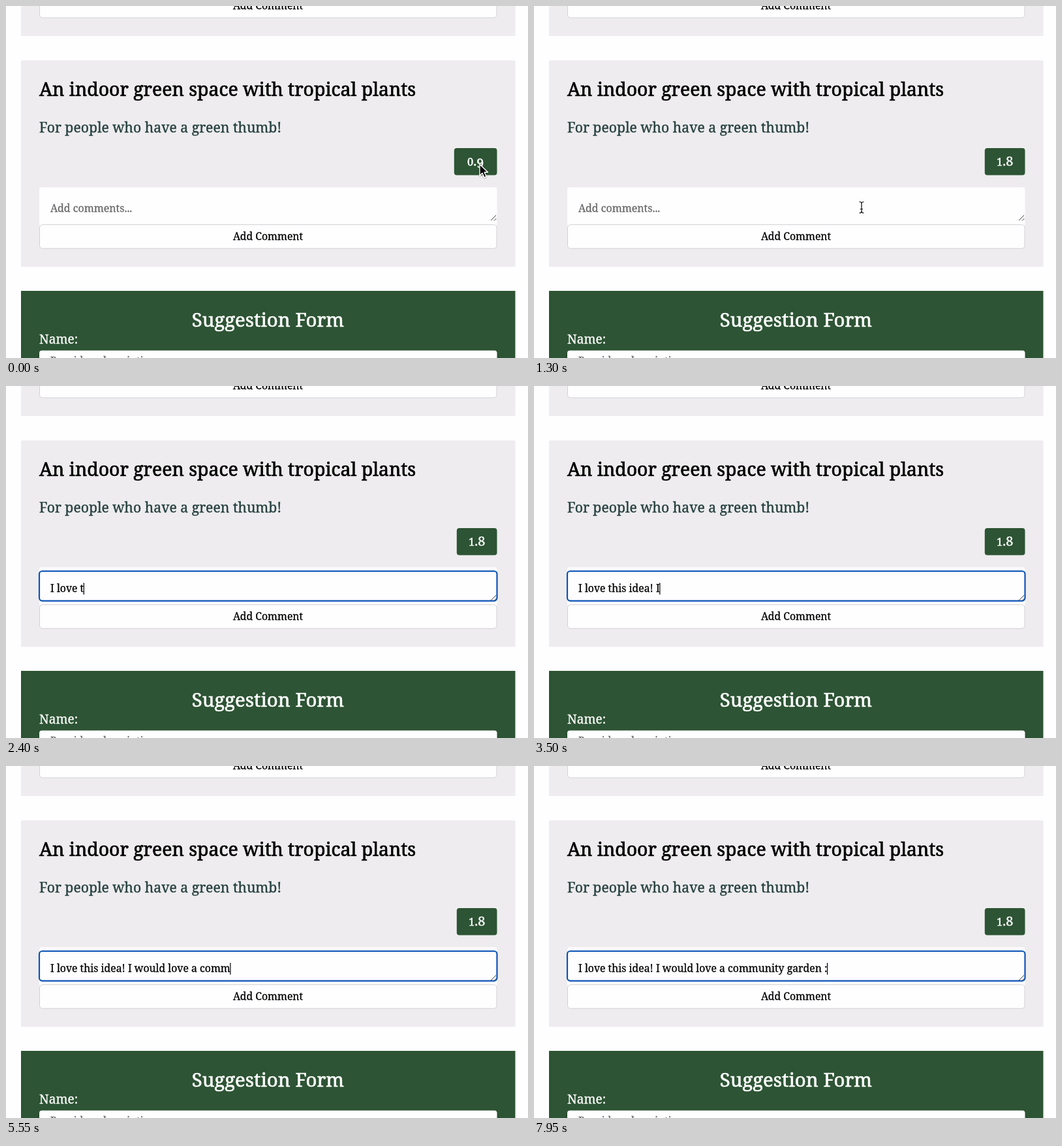
An HTML page for the animation above (8000 ms loop, 800 px wide and 540 px high).

```html
<!DOCTYPE html>
<html lang="en">
<head>
<meta charset="utf-8">
<title>Community suggestions</title>
<style>
  html, body { margin: 0; width: 100%; height: 100%; overflow: hidden; background: #fefdff; }
  svg { display: block; width: 800px; height: 540px; }
  text {
    font-family: "Noto Serif", serif; font-size: 15.8px; white-space: pre;
    color: #000; fill: currentColor; stroke: currentColor; stroke-width: .3px;
  }
  .mid { text-anchor: middle; }
  .title { font-size: 28.45px; stroke-width: .7px; }
  .sub { font-size: 21.2px; color: #264040; stroke-width: .4px; }
  .hint { font-size: 15.95px; color: #686868; }
  .light { color: #fff; }
  .heading { font-size: 29.4px; stroke-width: .7px; }
  .label { font-size: 19.2px; }
  .score { font-size: 19.8px; stroke-width: .5px; }
  .small-figure { font-size: 16.5px; }
  .panel { fill: #fefdff; }
  .green { fill: #2d5434; }
</style>
</head>
<body>
<svg viewBox="0 0 800 540">
  <defs>
    <filter id="soft" x="-50%" y="-50%" width="200%" height="200%">
      <feDropShadow dx="0" dy="1" stdDeviation="1" flood-opacity=".35"/>
    </filter>
    <g id="card">
      <rect x="23" y="83.5" width="757.5" height="316.5" fill="#eeecee"/>
      <rect class="panel" x="51" y="278" width="701.5" height="60" rx="4"/>
      <rect class="panel" x="51.5" y="335.5" width="700.5" height="36.5" rx="4.5" stroke="#d2d1d4"/>
      <text class="mid" x="401.5" y="359">Add Comment</text>
    </g>
    <path id="beam-shape" d="M-3 -8.5 Q0 -8.5 0 -6 V6 Q0 8.5 -3 8.5 M3 -8.5 Q0 -8.5 0 -6 M0 6 Q0 8.5 3 8.5 M-1.5 2.5 H1.5"/>
  </defs>
  <rect class="panel" width="800" height="540"/>
  <use href="#card" y="-354"/>
  <use href="#card"/>

  <text class="title" x="51" y="138">An indoor green space with tropical plants</text>
  <text class="sub" x="51" y="193.5">For people who have a green thumb!</text>
  <rect id="badge" class="green" y="218" height="41.5" rx="4"/>
  <text id="score" class="score light mid" y="245"></text>

  <rect id="focus" x="51" y="284" width="701.5" height="45.6" rx="4.5" fill="#fefdff" stroke="#0c54b6" stroke-width="2.2"/>
  <path d="M743 329 L751 321 M748 329.5 L751.5 326" stroke="#444" fill="none"/>
  <text id="hint" class="hint" x="68" y="316">Add comments...</text>
  <text id="typed" x="68" y="316"></text>
  <rect id="caret" y="302" width="1.2" height="18"/>

  <rect class="green" x="23" y="437" width="757.5" height="103"/>
  <text class="heading light mid" x="401.5" y="492">Suggestion Form</text>
  <text class="label light" x="51" y="517.5">Name:</text>
  <rect class="panel" x="51" y="528.5" width="701.5" height="40" rx="4" filter="url(#soft)"/>
  <text class="hint" x="68" y="550">Provide a description</text>

  <path id="arrow" d="M0 0 V17 L4 13.2 L7 20 L10 18.7 L7.1 12 H12.5 Z" stroke="#fff" stroke-width="1.3" stroke-linejoin="round" filter="url(#soft)"/>
  <g id="beam" fill="none" stroke-linecap="round">
    <use href="#beam-shape" stroke="#fff" stroke-width="2.6"/>
    <use href="#beam-shape" stroke="#000" stroke-width="1.2"/>
  </g>
</svg>
<script>
const LOOP = 8000, FOCUS_AT = 1550, TYPING_AT = 1650;
const MESSAGE = "I love this idea! I would love a community garden :";
const SCORES = [[0, "0.9"], [200, "1.2"], [450, "1.5"], [700, "1.8"]];
// [time, characters typed]
const TYPING = [[TYPING_AT, 0], [2370, 8], [4510, 29], [5510, 37], [6760, 45], [7450, 50], [7800, 50], [7850, 51]];
const MOVE = { start: 820, end: 1270, from: [726, 243], to: [502, 309] };

const [badge, score, focusRing, hint, typed, caret, arrow, beam] =
  ["badge", "score", "focus", "hint", "typed", "caret", "arrow", "beam"].map(id => document.getElementById(id));
const show = (node, on) => node.setAttribute("visibility", on ? "visible" : "hidden");
const clamp = v => Math.max(0, Math.min(1, v));

function track(points, t) {
  if (t <= points[0][0]) return points[0][1];
  for (let i = 1; i < points.length; i++) {
    const [t0, a] = points[i - 1], [t1, b] = points[i];
    if (t < t1) return a + (b - a) * (t - t0) / (t1 - t0);
  }
  return points.at(-1)[1];
}

// Old-style figures: 0-2 sit at x-height, most others hang below the baseline.
function oldStyle(value) {
  let shift = 0;
  return [...value].map(c => {
    const target = "34579".includes(c) ? 3 : 0;
    const dy = target - shift;
    shift = target;
    return `<tspan dy="${dy}" class="${"012".includes(c) ? "small-figure" : ""}">${c}</tspan>`;
  }).join("");
}

let shownScore;
function drawScore(t) {
  const value = SCORES.findLast(([at]) => t >= at)[1];
  if (value === shownScore) return;
  shownScore = value;
  const left = value[0] === "0" ? 686.8 : 690.8, right = 752.5;
  badge.setAttribute("x", left);
  badge.setAttribute("width", right - left);
  score.setAttribute("x", (left + right) / 2);
  score.innerHTML = oldStyle(value);
}

function drawInput(t) {
  const focused = t >= FOCUS_AT;
  const text = MESSAGE.slice(0, Math.floor(track(TYPING, t) + 1e-6));
  show(focusRing, focused);
  show(caret, focused);
  show(hint, !text);
  if (typed.textContent !== text) typed.textContent = text;
  caret.setAttribute("x", 67.5 + (text ? typed.getComputedTextLength() : 0));
}

function drawPointer(t) {
  const k = clamp((t - MOVE.start) / (MOVE.end - MOVE.start));
  const ease = k * k * (3 - 2 * k);
  const [x, y] = MOVE.from.map((a, i) => a + (MOVE.to[i] - a) * ease);
  const overField = y > 278;
  show(arrow, !overField);
  show(beam, overField && t < TYPING_AT);
  for (const node of [arrow, beam]) node.setAttribute("transform", `translate(${x} ${y})`);
}

const begin = performance.now();
function draw() {
  const t = (performance.now() - begin) % LOOP;
  drawScore(t);
  drawInput(t);
  drawPointer(t);
  requestAnimationFrame(draw);
}
draw();
</script>
</body>
</html>
```
